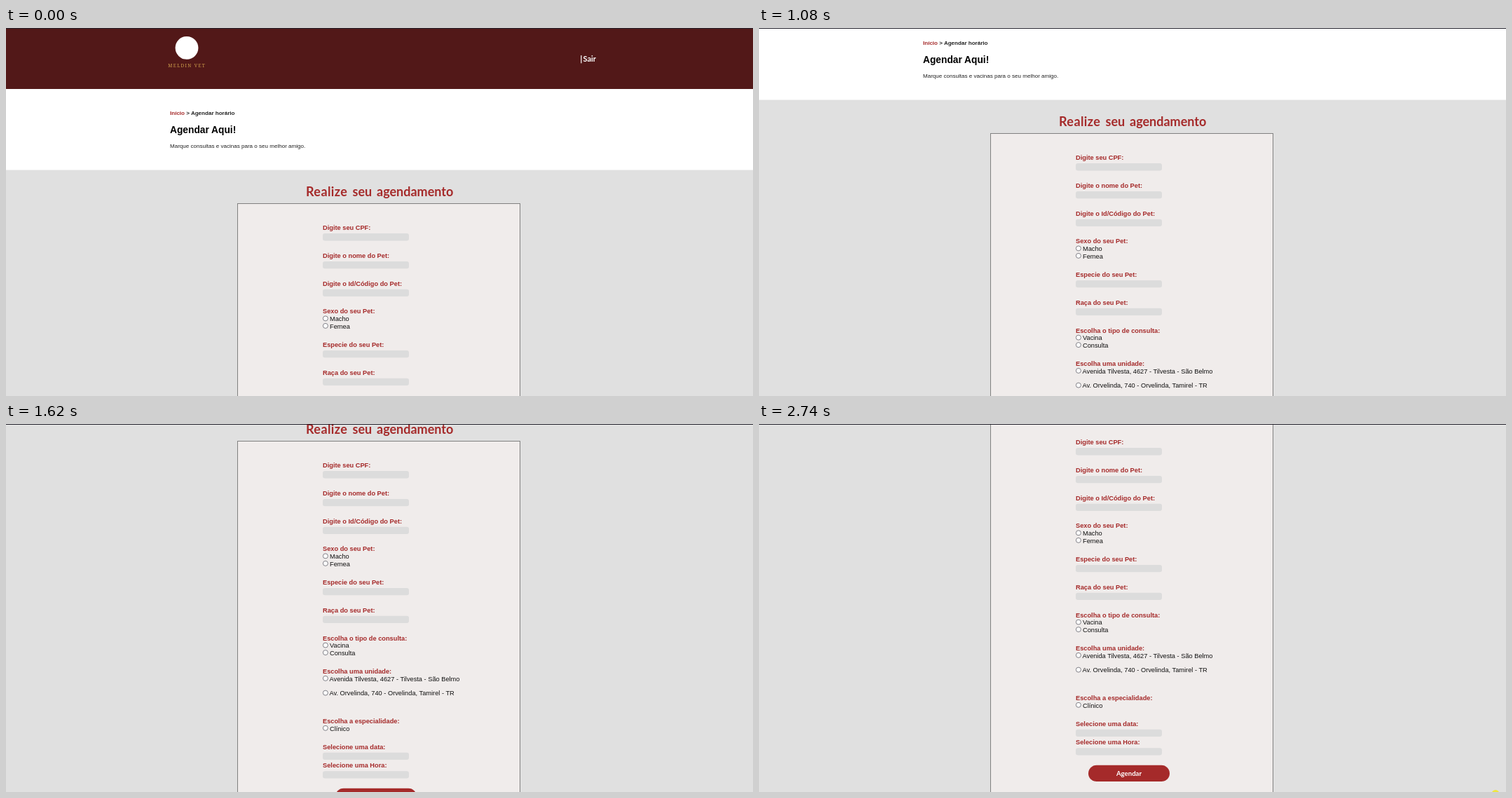
An HTML page that plays this animation: 1066x525 px, repeating every 2.82 s.

```html
<!DOCTYPE html>
<html lang="pt-BR">
<head>
<meta charset="utf-8">
<title>Agendar horário</title>
<style>
  html, body { margin: 0; width: 100%; height: 100%; overflow: hidden; background: #e0e0e0; }
  svg { display: block; width: 100vw; height: 100vh; }
  text { font-family: "Liberation Sans", Arial, sans-serif; white-space: pre; }
  .label { font-size: 9.25px; font-weight: bold; fill: #a52a2a; }
  .option { font-size: 9.25px; fill: #111; }
  .small { font-size: 8.05px; fill: #222; }
  .round { font-family: Lato, sans-serif; font-weight: bold; }
</style>
</head>
<body>
<svg id="stage" viewBox="0 0 1066 525" xmlns="http://www.w3.org/2000/svg">
  <rect width="1066" height="525" fill="#e0e0e0"/>
  <g id="page">
    <rect width="1066" height="87" fill="#521818"/>
    <rect y="87" width="1066" height="115.6" fill="#fff"/>
    <circle cx="258" cy="28.3" r="16.4" fill="#fff"/>
    <text x="231.3" y="56" style="font:6.5px 'Noto Serif',serif;letter-spacing:1.35px" fill="#cfa04c">MELDIN VET</text>
    <rect x="820.3" y="39" width="1.2" height="11.3" fill="#fff"/>
    <text class="round" x="823.5" y="48.4" font-size="11" fill="#fff">Sair</text>
    <text class="small" x="234" y="124" font-weight="bold"><tspan fill="#a52a2a">Início</tspan> &gt; Agendar horário</text>
    <text x="234" y="149.5" font-size="13.75" font-weight="bold" fill="#000">Agendar Aqui!</text>
    <text class="small" x="234" y="171">Marque consultas e vacinas para o seu melhor amigo.</text>
    <g class="round" font-size="18" fill="#a52a2a">
      <text class="round" x="428" y="239.6" letter-spacing=".4">Realize</text>
      <text class="round" x="494.5" y="239.6">seu</text>
      <text class="round" x="529" y="239.6">agendamento</text>
    </g>
    <rect x="330.5" y="250.5" width="403" height="600" fill="#f0eceb" stroke="#808080"/>
    <g id="form"></g>
    <rect x="470" y="745.7" width="116" height="23.4" rx="11.7" fill="#a52a2a"/>
    <text class="round" x="528" y="761.4" font-size="9.6" fill="#fff" text-anchor="middle">Agendar</text>
  </g>
  <rect width="1066" height="1" fill="#24222c"/>
  <circle id="glow" cx="1051" cy="527.7" r="5.7" fill="#efe640"/>
  <path id="cursor" d="M.5 .5V9.6L2.6 7.7L4 11L5.6 10.3L4.2 7.1H7Z" fill="#fff" stroke="#222" stroke-width=".8" stroke-linejoin="round"/>
</svg>
<script>
const LOOP = 2820, START = 660, TICK = 69.6, SLACK = 16;
const $ = id => document.getElementById(id);

function add(tag, attrs, text) {
  const el = document.createElementNS("http://www.w3.org/2000/svg", tag);
  for (const name in attrs) el.setAttribute(name, attrs[name]);
  if (text) el.textContent = text;
  $("form").appendChild(el);
}

// Every y below is the middle of its line.
const label = (y, text) => add("text", { class: "label", x: 452, y: y + 3.4 }, text);

function field(y, text, gap = 13.7) {
  label(y, text);
  add("rect", { x: 452, y: y + gap - 5.2, width: 123, height: 10.4, rx: 3, fill: "#dcdcdc" });
}

function option(y, text, x = 462) {
  add("circle", { cx: 455.9, cy: y - 0.4, r: 3.5, fill: "#fff", stroke: "#63636b", "stroke-width": 0.8 });
  add("text", { class: "option", x, y: y + 3.4 }, text);
}

field(284.5, "Digite seu CPF:");
field(324.4, "Digite o nome do Pet:");
field(364.2, "Digite o Id/Código do Pet:");
label(404, "Sexo do seu Pet:");
option(414.8, "Macho");
option(425.3, "Femea");
field(451.4, "Especie do seu Pet:");
field(491.2, "Raça do seu Pet:");
label(531.2, "Escolha o tipo de consulta:");
option(542, "Vacina");
option(552.5, "Consulta");
label(578.5, "Escolha uma unidade:");
option(589.3, "Avenida Tilvesta, 4627 - Tilvesta - São Belmo", 461.5);
option(610, "Av. Orvelinda, 740 - Orvelinda, Tamirel - TR", 461.5);
label(649.3, "Escolha a especialidade:");
option(660.2, "Clínico");
field(686.2, "Selecione uma data:");
field(712.7, "Selecione uma Hora:");

// Linear interpolation over rows of [step, value].
function along(keys, step) {
  if (step <= keys[0][0]) return keys[0][1];
  for (let i = 1; i < keys.length; i++) {
    const [a, from] = keys[i - 1], [b, to] = keys[i];
    if (step <= b) return from + (to - from) * (step - a) / (b - a);
  }
  return keys[keys.length - 1][1];
}

const scrollKeys = [[-1, 0], [0, 7], [6, 100], [11, 175], [14, 226], [15, 248], [16, 257], [17, 259]];
const cursorX = [[17, 1066], [20, 1052], [23, 1041], [24, 1037.5], [26, 1044]];
const cursorY = [[17, 462], [20, 442], [23, 430], [24, 451], [26, 506]];

function place(el, x, y) {
  el.setAttribute("transform", `translate(${x} ${y})`);
}

function draw(t) {
  const step = t < START ? -1 : Math.floor((t - START + SLACK) / TICK);
  place($("page"), 0, -Math.round(along(scrollKeys, step)));

  const leaving = t >= 70 && t < 130;
  const shown = leaving || (step >= 18 && step <= 26);
  $("cursor").style.display = shown ? "" : "none";
  if (leaving) place($("cursor"), 1062, 457);
  else place($("cursor"), along(cursorX, step), along(cursorY, step));
  $("glow").style.display = t >= 2740 ? "" : "none";
}

const begin = performance.now();
function loop() {
  draw((performance.now() - begin) % LOOP);
  requestAnimationFrame(loop);
}
loop();
</script>
</body>
</html>
```
